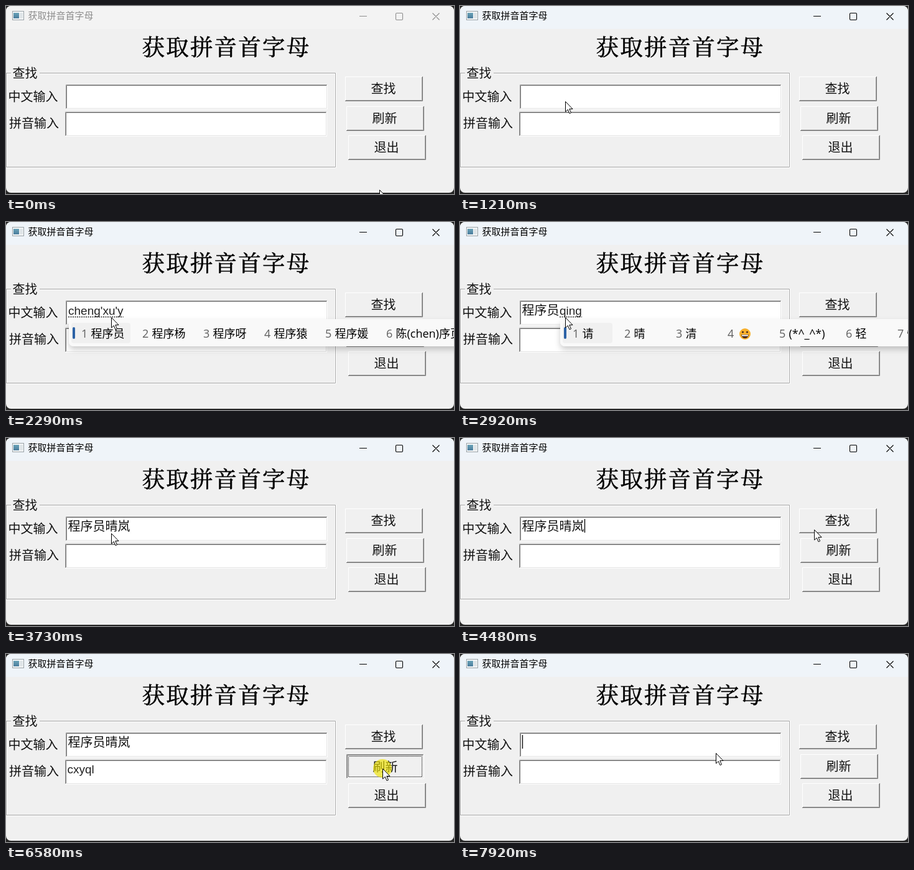
An HTML page for the animation above (7990 ms loop, 720 px wide and 304 px high).

```html
<!DOCTYPE html>
<html lang="zh-CN">
<head>
<meta charset="utf-8">
<style>
html, body { margin: 0; width: 100%; height: 100%; overflow: hidden; background: #262626; }
svg { display: block; width: 720px; height: 304px; }
text { font-family: "Noto Sans CJK SC", "Noto Sans CJK", sans-serif; white-space: pre; }
.ui { font-family: "Noto Sans CJK SC Light", "Noto Sans CJK SC", "Noto Sans CJK", sans-serif; font-size: 20px; font-weight: 300; fill: #111; }
.head { font-family: "Noto Serif CJK SC", "Noto Sans CJK SC", "Noto Sans CJK", serif; font-size: 36.5px; font-weight: 500; letter-spacing: 2.2px; stroke: #000; stroke-width: .6px; }
.latin { font-family: "Liberation Sans", Arial, sans-serif; font-size: 19px; fill: #222; }
.cand { font-family: "Open Sans", "Noto Sans CJK SC", "Noto Sans CJK", sans-serif; font-size: 18px; }
</style>
</head>
<body>
<svg id="stage" viewBox="0 0 720 304">
  <defs>
    <clipPath id="win"><rect width="720" height="302" rx="8"/></clipPath>
    <filter id="shade" x="-5%" y="-30%" width="110%" height="200%">
      <feDropShadow dx="0" dy="5" stdDeviation="5" flood-color="#000" flood-opacity=".2"/>
    </filter>
    <linearGradient id="pane" x2="0" y2="1"><stop stop-color="#6aa3b8"/><stop offset="1" stop-color="#4a7c9c"/></linearGradient>
  </defs>
  <rect width="720" height="304" fill="#262626"/>
  <g clip-path="url(#win)">
    <rect width="720" height="304" fill="#f0f0f0"/>
    <rect id="bar" width="720" height="37"/>
    <rect x="10.5" y="8.5" width="18" height="14" fill="#f4f6f7" stroke="#9aa3a8"/>
    <rect x="12" y="11" width="9" height="9" fill="url(#pane)"/>
    <rect x="22" y="11" width="5" height="9" fill="#dfe5e8"/>
    <text id="title" x="35.5" y="21" font-size="15">获取拼音首字母</text>
    <path id="sys" d="M568 16.5h12M685.5 11.5l11 11m0-11l-11 11M628 11.5h8q1.5 0 1.5 1.5v8q0 1.5-1.5 1.5h-8q-1.5 0-1.5-1.5v-8q0-1.5 1.5-1.5z" fill="none" stroke-width="1.1"/>
    <text class="head" x="218.5" y="80">获取拼音首字母</text>
    <g fill="none">
      <path d="M8 109.5H1.5V260.5H529.5M54 109.5H528.5V260" stroke="#fff"/>
      <path d="M8 108.5H.5V260.5H529.5V108.5H54" stroke="#a5a5a5"/>
      <path d="M0 261.5H530.5V108" stroke="#fff"/>
    </g>
    <text class="ui" x="10.5" y="116">查找</text>
    <text class="ui" x="3.5" y="154">中文输入</text>
    <text class="ui" x="5" y="196.5">拼音输入</text>
    <g id="fields"></g>
    <g id="buttons"></g>
    <text id="entry" class="ui" x="99.5" y="150"></text>
    <text id="comp" class="latin" y="150"></text>
    <path id="under" stroke="#222" stroke-width="1.5" stroke-dasharray="2 1.5"/>
    <text id="result" class="latin" x="98.5" y="193">cxyql</text>
    <path id="caret" stroke="#000" stroke-width="1.3"/>
    <g id="ime"></g>
  </g>
  <circle id="dot" r="15" fill="#eee200" opacity=".65"/>
  <path id="mouse" d="M.5 .5V17L4.3 13.5 7 19.8 9.5 18.7 6.8 12.5H12z" fill="#fff" stroke="#000" stroke-linejoin="round"/>
</svg>
<script>
const LOOP = 7990;
const $ = id => document.getElementById(id);

// Typing: time, committed text, composition, candidates
const TYPED = [
  [0, '', ''],
  [1350, '', 'c', '从 出 才 长 成 次 错'],
  [1490, '', 'ch', '出 吃 车 长 成 场 处'],
  [1620, '', 'che', '陈 琛 臣 晨 Cherub 辰 沉'],
  [1690, '', 'chen', '陈 琛 臣 晨 沉 辰 尘'],
  [1760, '', 'cheng', '成 程 城 称 乘 承 诚'],
  [1890, '', "cheng'x", '程序 呈现 成型 诚信 城乡 成效 成行'],
  [2020, '', "cheng'xu", '程序 成需 承续 成 程 城 称'],
  [2160, '', "cheng'xu'y", '程序员 程序杨 程序呀 程序猿 程序媛 陈(chen)序页'],
  [2430, '程序员', ''],
  [2650, '程序员', 'q', '去 请 前 起 钱 且 全'],
  [2720, '程序员', 'qi', '起 其 期 气 七 器 奇'],
  [2790, '程序员', 'qin', '亲 琴 勤 侵 寝 芹 沁'],
  [2920, '程序员', 'qing', '请 晴 清 :D (*^_^*) 轻 情'],
  [3060, '程序员', "qing'l", '晴岚 情侣 清理 清凉 请 晴 清'],
  [3200, '程序员晴岚', ''],
  [6650, '', '']
];

// Pointer path: time, x, y
const PATH = [
  [60, 600, 297], [270, 470, 250], [450, 260, 175], [590, 169, 154],
  [3960, 169, 154], [4180, 290, 171], [4330, 450, 169], [4480, 569, 148],
  [4620, 585, 142], [4760, 578, 134], [5380, 578, 134], [5800, 586, 160],
  [6180, 598, 187], [6420, 605, 185], [6660, 605, 185], [6800, 520, 166],
  [6980, 402, 150], [7180, 411, 153], [7919, 411, 153], [7920, 411, 160]
];

const CLICKS = [[610, 680], [4830, 5030], [6450, 6650]];

// Carets: from, until, x
const CARETS = [[680, 1210, 100.5], [2430, 2650, 160.5], [3200, 3730, 200.5],
  [4260, 4780, 200.5], [6650, 7180, 100.5], [7720, LOOP, 100.5]];

const BUTTONS = [[545, 114, '查找'], [547, 162, '刷新'], [550, 209, '退出']];

const within = (t, a, b) => t >= a && t < b;
const show = (el, on) => el.setAttribute('visibility', on ? 'visible' : 'hidden');

function edge(x, y, w, h, light, dark) {
  return `<path d="M${x + .5} ${y + h - .5}V${y + .5}H${x + w - .5}" fill="none" stroke="${light}"/>` +
    `<path d="M${x} ${y + h - .5}H${x + w - .5}V${y}" fill="none" stroke="${dark}"/>`;
}

function sunken(x, y, w, h) {
  return edge(x, y, w, h, '#9a9a9a', '#fff') + edge(x + 1, y + 1, w - 2, h - 2, '#787878', '#e3e3e3');
}

function raised(x, y, w, h) {
  return edge(x, y, w, h, '#fff', '#787878') + edge(x + 1, y + 1, w - 2, h - 2, '#f0f0f0', '#9a9a9a');
}

function field(x, y, w, h) {
  return `<rect x="${x}" y="${y}" width="${w}" height="${h}" fill="#fff"/>` + sunken(x, y, w, h);
}

function button([x, y, label], pressed, focused) {
  const w = 125, h = 40, d = pressed ? 1 : 0;
  const edges = (pressed ? sunken : raised)(x, y, w, h);
  const ring = focused ? `<rect x="${x + 3.5}" y="${y + 3.5}" width="${w - 7}" height="${h - 7}" fill="none" stroke="#000" stroke-dasharray="1 1" stroke-dashoffset=".5"/>` : '';
  return `<rect x="${x}" y="${y}" width="${w}" height="${h}" fill="#f0f0f0"/>${edges}${ring}` +
    `<text class="ui" text-anchor="middle" x="${x + 61.5 + d}" y="${y + 26.5 + d}">${label}</text>`;
}

function face(x, y) {
  return `<circle cx="${x}" cy="${y}" r="9" fill="#f8b02c"/><g fill="#4a2b1c">` +
    `<circle cx="${x - 3.5}" cy="${y - 3}" r="1.6"/><circle cx="${x + 3.5}" cy="${y - 3}" r="1.6"/>` +
    `<path d="M${x - 6} ${y + 1}h12q-1 6-6 6t-6-6z"/></g>` +
    `<path d="M${x - 5} ${y + 1.5}h10v2h-10z" fill="#fff"/>`;
}

function wide(word) {
  if (word === ':D') return 18;
  if (word === 'Cherub') return 64;
  if (word[0] === '(') return 63;
  return word.length * 18;
}

function panel(left, words) {
  let x = left + 20, out = '';
  const pitch = word => Math.max(83, wide(word) + 44);
  words.forEach((word, i) => {
    out += `<text class="cand" x="${x}" y="187" fill="#5f5f5f">${i + 1}</text>`;
    out += word === ':D' ? face(x + 28, 181) : `<text class="cand" x="${x + 15.5}" y="187">${word}</text>`;
    x += pitch(word);
  });
  return `<rect x="${left}" y="157" width="660" height="44" rx="8" fill="#f9f9f9" filter="url(#shade)"/>` +
    `<rect x="${left + 4}" y="163" width="${pitch(words[0]) - 3}" height="33" rx="4" fill="#f0f0f0"/>` +
    `<rect x="${left + 6}" y="170" width="4" height="19" rx="2" fill="#2c62a6"/>${out}` +
    `<path d="M${x - 13.5} 164v32" stroke="#e4e4e4"/>`;
}

function pointer(t) {
  if (t <= PATH[0][0]) return PATH[0].slice(1);
  const i = PATH.findIndex(p => p[0] > t);
  if (i < 0) return PATH[PATH.length - 1].slice(1);
  const [a, ax, ay] = PATH[i - 1], [b, bx, by] = PATH[i];
  const k = (t - a) / (b - a);
  return [ax + (bx - ax) * k, ay + (by - ay) * k];
}

let lastStep, lastButtons;

function setTyping(step) {
  if (step === lastStep) return;
  lastStep = step;
  const [, done, comp, words] = step;
  const x = 100 + done.length * 20;
  $('entry').textContent = done;
  $('comp').textContent = comp;
  $('comp').setAttribute('x', x);
  const w = comp ? $('comp').getComputedTextLength() : 0;
  $('under').setAttribute('d', `M${x} 153.5h${w}`);
  $('ime').innerHTML = words ? panel(x + 1, words.split(' ')) : '';
}

function setButtons(pressed, focused) {
  const key = pressed + '/' + focused;
  if (key === lastButtons) return;
  lastButtons = key;
  $('buttons').innerHTML = BUTTONS.map((b, i) => button(b, i === pressed, i === focused)).join('');
}

function draw(t) {
  const active = t >= 610;
  $('bar').setAttribute('fill', active ? '#eff4f9' : '#f3f3f3');
  $('title').setAttribute('fill', active ? '#000' : '#8d8d8d');
  $('sys').setAttribute('stroke', active ? '#000' : '#8d8d8d');

  setTyping(TYPED.filter(s => s[0] <= t).pop());
  const click = CLICKS.findIndex(c => within(t, c[0], c[1]));
  const focus = within(t, 4830, 6450) ? 0 : within(t, 6450, 6650) ? 1 : -1;
  setButtons(click > 0 ? click - 1 : -1, focus);
  show($('result'), within(t, 5030, 6650));

  const caret = CARETS.find(c => within(t, c[0], c[1]));
  $('caret').setAttribute('d', caret ? `M${caret[2]} 131v22` : '');

  const [x, y] = pointer(t);
  $('mouse').setAttribute('transform', `translate(${x} ${y})`);
  $('dot').setAttribute('cx', x);
  $('dot').setAttribute('cy', y);
  show($('dot'), click >= 0);
}

$('fields').innerHTML = field(96, 127, 421, 40) + field(95, 171, 421, 40);
const start = performance.now();
function tick() {
  draw((performance.now() - start) % LOOP);
  requestAnimationFrame(tick);
}
tick();
</script>
</body>
</html>
```
